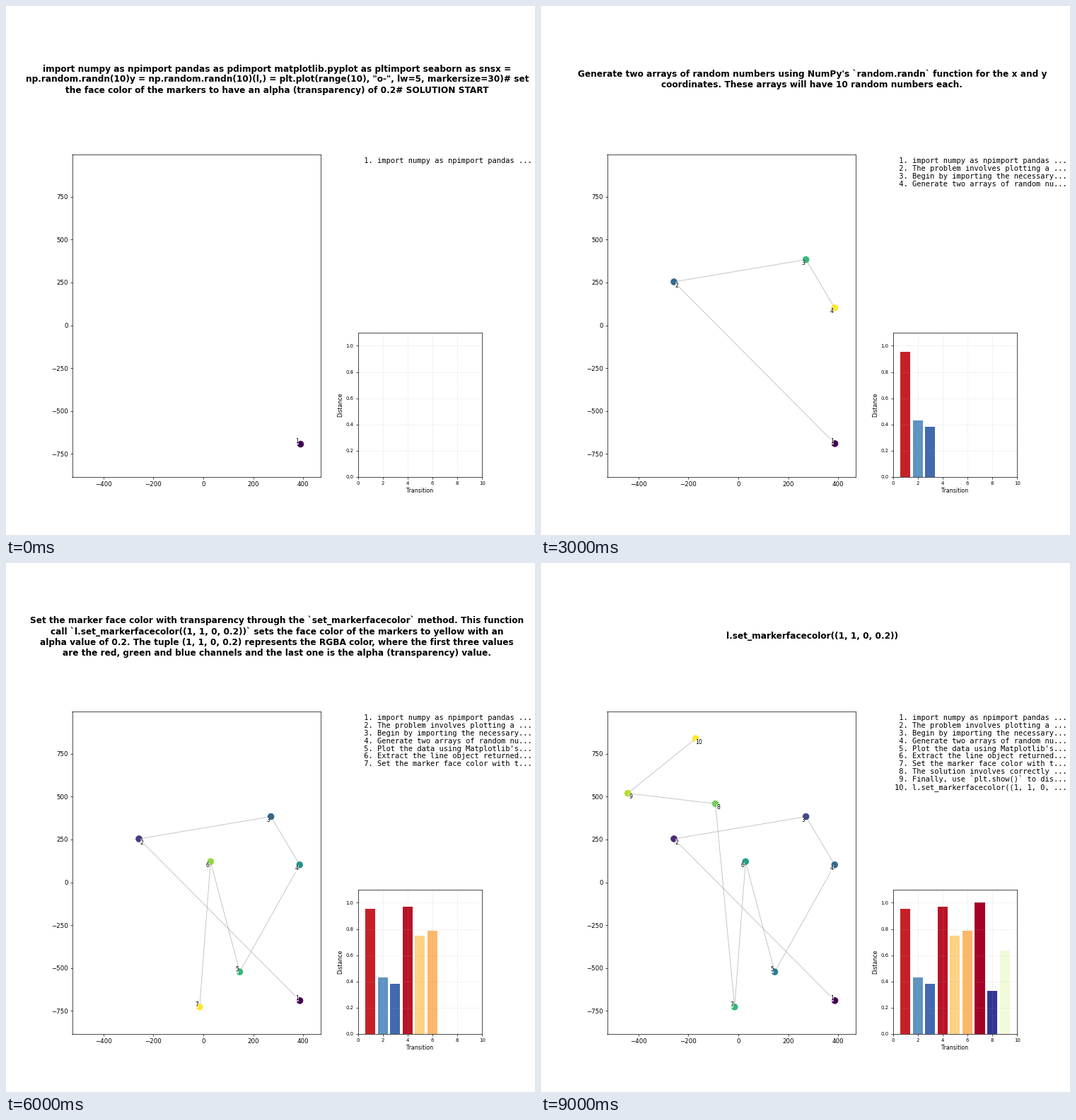
A matplotlib script for the animation above (10000 ms loop, 748 by 748 pixels).

```python
import numpy as np
import matplotlib.pyplot as plt
from matplotlib.animation import FuncAnimation

np.random.seed(0)

SIZE = 748
DPI = SIZE / 12
plt.rcParams["font.family"] = "DejaVu Sans"

STEPS = [
    "import numpy as npimport pandas as pdimport matplotlib.pyplot as pltimport seaborn as "
    "snsx = np.random.randn(10)y = np.random.randn(10)(l,) = plt.plot(range(10), \"o-\", "
    "lw=5, markersize=30)# set the face color of the markers to have an alpha "
    "(transparency) of 0.2# SOLUTION START",
    "The problem involves plotting a line with markers using Matplotlib and customizing "
    "the markers with a specific face color and transparency (alpha).",
    "Begin by importing the necessary libraries: NumPy, Pandas, Matplotlib, and Seaborn. "
    "These libraries are essential for data manipulation and plotting.",
    "Generate two arrays of random numbers using NumPy's `random.randn` function for the "
    "x and y coordinates. These arrays will have 10 random numbers each.",
    "Plot the data using Matplotlib's `plot` function. The function `plt.plot(range(10), "
    "'o-', lw=5, markersize=30)` will plot a line with circular markers. The `range(10)` "
    "specifies the x-coordinates from 0 to 9, and the y-coordinates are not specified "
    "correctly here as it should include the y-values. The 'o-' specifies a line with "
    "circle markers, `lw=5` sets the line width to 5, and `markersize=30` sets the size "
    "of the markers.",
    "Extract the line object returned by `plt.plot` to customize the markers. The `plot` "
    "function returns a list of line objects, and we need to extract the line object by "
    "using (l,) = plt.plot(...).",
    "Set the marker face color with transparency through the `set_markerfacecolor` method. "
    "This function call `l.set_markerfacecolor((1, 1, 0, 0.2))` sets the face color of the "
    "markers to yellow with an alpha value of 0.2. The tuple (1, 1, 0, 0.2) represents the "
    "RGBA color, where the first three values are the red, green and blue channels and the "
    "last one is the alpha (transparency) value.",
    "The solution involves correctly identifying the usage of `set_markerfacecolor` to "
    "apply the desired color and transparency to the markers.",
    "Finally, use `plt.show()` to display the plot.",
    "l.set_markerfacecolor((1, 1, 0, 0.2))",
]
POINTS = np.array([(387, -691), (-258, 254), (271, 384), (386, 102), (146, -523),
                   (29, 121), (-15, -728), (-92, 459), (-443, 520), (-171, 840)])
DIST = np.array([0.955, 0.43, 0.383, 0.972, 0.748, 0.785, 1.0, 0.326, 0.634])


def wrap(text, width=100):
    lines = [""]
    for word in text.split():
        joined = (lines[-1] + " " + word).strip()
        if len(joined) <= width:
            lines[-1] = joined
        else:
            lines.append(word)
    return "\n".join(lines)


def add_axes(left, top, right, bottom):
    """Axes from pixel edges, measured from the top left corner."""
    return fig.add_axes([left / SIZE, 1 - bottom / SIZE,
                         (right - left) / SIZE, (bottom - top) / SIZE])


def add_text(x, y, text="", **style):
    return fig.text(x / SIZE, 1 - y / SIZE, text, **style)


fig = plt.figure(figsize=(12, 12), dpi=DPI, facecolor="white")
title = add_text(383.35, 104, ha="center", va="center", fontsize=14, fontweight="bold")

# Path of the steps
path_ax = add_axes(93.5, 210.2, 444.83, 665.72)
low, high = POINTS.min(axis=0), POINTS.max(axis=0)
margin = 0.1 * (high - low)
path_ax.set_xlim(low[0] - margin[0], high[0] + margin[0])
path_ax.set_ylim(low[1] - margin[1], high[1] + margin[1])
path, = path_ax.plot([], [], color="gray", alpha=0.5, lw=1)
dots = path_ax.scatter([], [], s=100, zorder=3)

middle = (low + high) / 2
labels = []
for i, point in enumerate(POINTS):
    dx, dy = np.where(point < middle, 4.8, -4.8)
    labels.append(path_ax.annotate(
        str(i + 1), point, (dx, dy), textcoords="offset points", fontsize=9,
        ha="center", va="center_baseline", zorder=4,
        bbox=dict(facecolor="white", edgecolor="none", alpha=0.7, pad=0.3)))

# List of the steps so far
rows = [add_text(500, 222 + 10.89 * i, f"{i + 1:2d}. {text[:32]}" + "...",
                 fontsize=12, family="DejaVu Sans Mono", va="baseline")
        for i, text in enumerate(STEPS)]

# Distance between neighbouring steps
bar_ax = add_axes(497.53, 461.95, 673.2, 665.72)
shade = (DIST - DIST.min()) / (DIST.max() - DIST.min())
bars = bar_ax.bar(np.arange(1, 10), DIST, width=0.8, color=plt.cm.RdYlBu_r(shade))
bar_ax.set_xlim(0, 10)
bar_ax.set_ylim(0, 1.1)
bar_ax.set_xticks(range(0, 11, 2))
bar_ax.set_yticks(np.arange(6) / 5)
bar_ax.tick_params(labelsize=8)
bar_ax.set_xlabel("Transition", fontsize=9)
bar_ax.set_ylabel("Distance", fontsize=9)
bar_ax.grid(True, linestyle="--", alpha=0.3)


def show_first(artists, count):
    for i, artist in enumerate(artists):
        artist.set_visible(i < count)


def update(step):
    count = step + 1
    title.set_text(wrap(STEPS[step]))
    path.set_data(*POINTS[:count].T)
    dots.set_offsets(POINTS[:count])
    dots.set_color(plt.cm.viridis(np.linspace(0, 1, count)))
    show_first(labels, count)
    show_first(rows, count)
    show_first(bars, step)
    return []


anim = FuncAnimation(fig, update, frames=len(STEPS), init_func=lambda: update(0),
                     interval=1000, repeat=True, repeat_delay=0)
plt.show()
```
